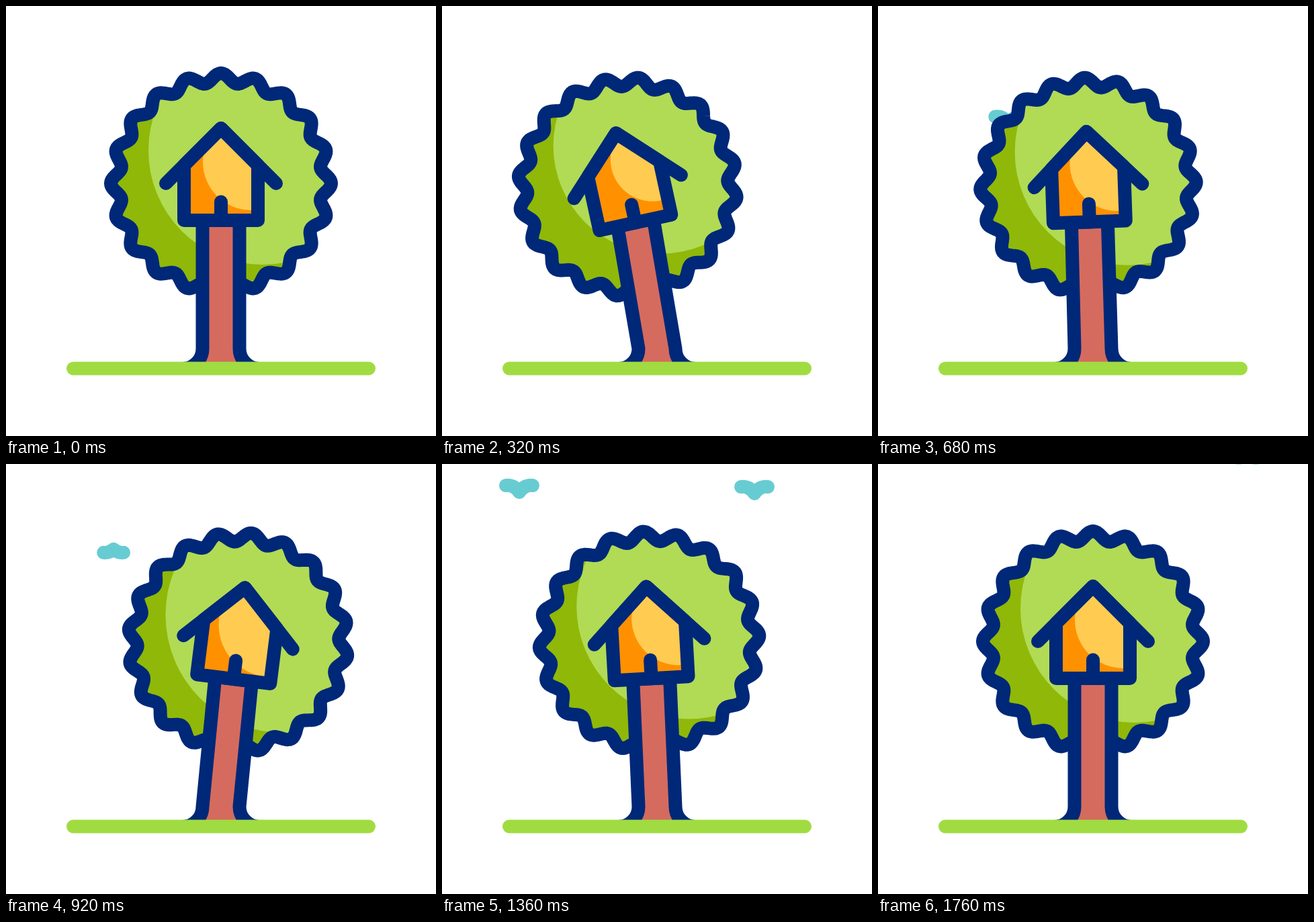
Animation of 640 by 640 pixels, one loop 1.9 s. Source, as an HTML page with a canvas:

```html
<!DOCTYPE html>
<html lang="en">
<head>
<meta charset="utf-8">
<title>Swaying tree house</title>
<style>
html, body { margin: 0; width: 100%; height: 100%; overflow: hidden; background: #fff; }
canvas { display: block; width: 640px; height: 640px; }
</style>
</head>
<body>
<canvas id="stage" width="640" height="640"></canvas>
<script>
const ctx = document.getElementById('stage').getContext('2d');
const LOOP = 1900, STEP = 20, TAU = Math.PI * 2;
const NAVY = '#002878', GRASS = '#a0dc41', LEAF = '#b1db54', SHADE = '#90b808',
      WOOD = '#d56b5e', ORANGE = '#ff9100', YELLOW = '#ffcb51', SKY = '#67ccd2';

// A swing that halves and turns round at each key time, then rests.
const SWING = 15.2 * Math.PI / 180;
const keyTimes = [0, 445, 870, 1270, 1620];
const swingAt = i => i % 4 ? SWING * (-0.5) ** (i - 1) : 0;

// The house leans by the full angle, the trunk below it a little less.
function leanPose(i) {
  const a = -swingAt(i), bend = a * 0.79, len = 191;
  return {
    cos: Math.cos(a), sin: Math.sin(a),
    x: 320 + len * Math.sin(bend), y: 510 - len * Math.cos(bend)
  };
}

const mix = (a, b, k) => a + (b - a) * k;
const smooth = p => p * p * (3 - 2 * p);

function poseAt(t) {
  const i = keyTimes.findIndex(k => k > t);
  if (i < 0) return leanPose(0);
  const a = leanPose(i - 1), b = leanPose(i);
  const k = smooth((t - keyTimes[i - 1]) / (keyTimes[i] - keyTimes[i - 1]));
  const pose = {};
  for (const key in a) pose[key] = mix(a[key], b[key], k);
  return pose;
}

function stroke(path, color = NAVY) {
  ctx.strokeStyle = color;
  ctx.stroke(path);
}

function fill(path, color) {
  ctx.fillStyle = color;
  ctx.fill(path);
}

function poly(points, closed) {
  const p = new Path2D();
  points.forEach(q => p.lineTo(...q));
  if (closed) p.closePath();
  return p;
}

// Fills a shape with its shadow colour and a lit circle inside it.
function litShape(path, dark, light, center, r) {
  fill(path, dark);
  ctx.save();
  ctx.clip(path);
  const disc = new Path2D();
  disc.arc(...center, r, 0, TAU);
  fill(disc, light);
  ctx.restore();
  stroke(path);
}

function drawTree(t) {
  const { cos, sin, x: bx, y: by } = poseAt(t);
  // Maps a point of the upright tree to the leaning one.
  const at = (x, y) => [
    bx + (x - 320) * cos - (y - 319) * sin,
    by + (x - 320) * sin + (y - 319) * cos
  ];
  const grow = 45 * sin;

  const crown = [];
  for (let i = 0; i < 400; i++) {
    const a = i / 400 * TAU, r = 157 + 7 * Math.cos(20 * a);
    crown.push(at(320 + r * Math.sin(a), 264 - r * Math.cos(a)));
  }
  litShape(poly(crown, true), SHADE, LEAF, at(382, 215), 170 + grow);

  const trunk = new Path2D();
  trunk.moveTo(262.5, 540);
  trunk.bezierCurveTo(279, 540, 292.5, 526.5, 292.5, 510);
  trunk.lineTo(...at(292.5, 319));
  trunk.lineTo(...at(347.5, 319));
  trunk.lineTo(347.5, 510);
  trunk.bezierCurveTo(347.5, 526.5, 361, 540, 377.5, 540);
  ctx.save();
  ctx.beginPath();
  ctx.rect(0, 0, 640, 535);
  ctx.clip();
  fill(trunk, WOOD);
  stroke(trunk);
  ctx.restore();

  const house = poly([at(265, 319), at(265, 237), at(320, 182), at(375, 237), at(375, 319)], true);
  litShape(house, ORANGE, YELLOW, at(365, 232), 72 + grow);
  stroke(poly([at(238, 264), at(320, 182), at(402, 264)]));
  stroke(poly([at(320, 291.5), at(320, 319)]));
}

// Position, speed and bend of each flight, per 100 ms around 1360 ms.
const birds = [
  { x: 115, y: 32, vx: -7.7, vy: -28.5, ax: 0.58, ay: -1.32 },
  { x: 465, y: 34, vx: 21.1, vy: -19.4, ax: 0, ay: 2.13 }
];

function drawBird(b, t) {
  const u = (t - 1360) / 100;
  const x = b.x + b.vx * u + b.ax * u * u;
  const y = b.y + b.vy * u + b.ay * u * u;
  const flap = Math.cos(u / 1.68 * TAU);
  const half = 17.1 + 2.9 * flap, dip = 1.3 + 8.7 * flap;
  const p = new Path2D();
  p.moveTo(x - half, y);
  p.quadraticCurveTo(x - half * 0.4, y - dip * 0.15, x, y + dip);
  p.quadraticCurveTo(x + half * 0.4, y - dip * 0.15, x + half, y);
  stroke(p, SKY);
}

function draw(t) {
  ctx.fillStyle = '#fff';
  ctx.fillRect(0, 0, 640, 640);
  ctx.lineWidth = 20;
  ctx.lineCap = ctx.lineJoin = 'round';
  if (t >= 600) birds.forEach(b => drawBird(b, t));
  drawTree(t);
  stroke(poly([[100, 539.5], [540, 539.5]]), GRASS);
}

const start = performance.now();
function tick() {
  const t = (performance.now() - start) % LOOP;
  draw(Math.floor(t / STEP) * STEP);
  requestAnimationFrame(tick);
}
tick();
</script>
</body>
</html>
```
